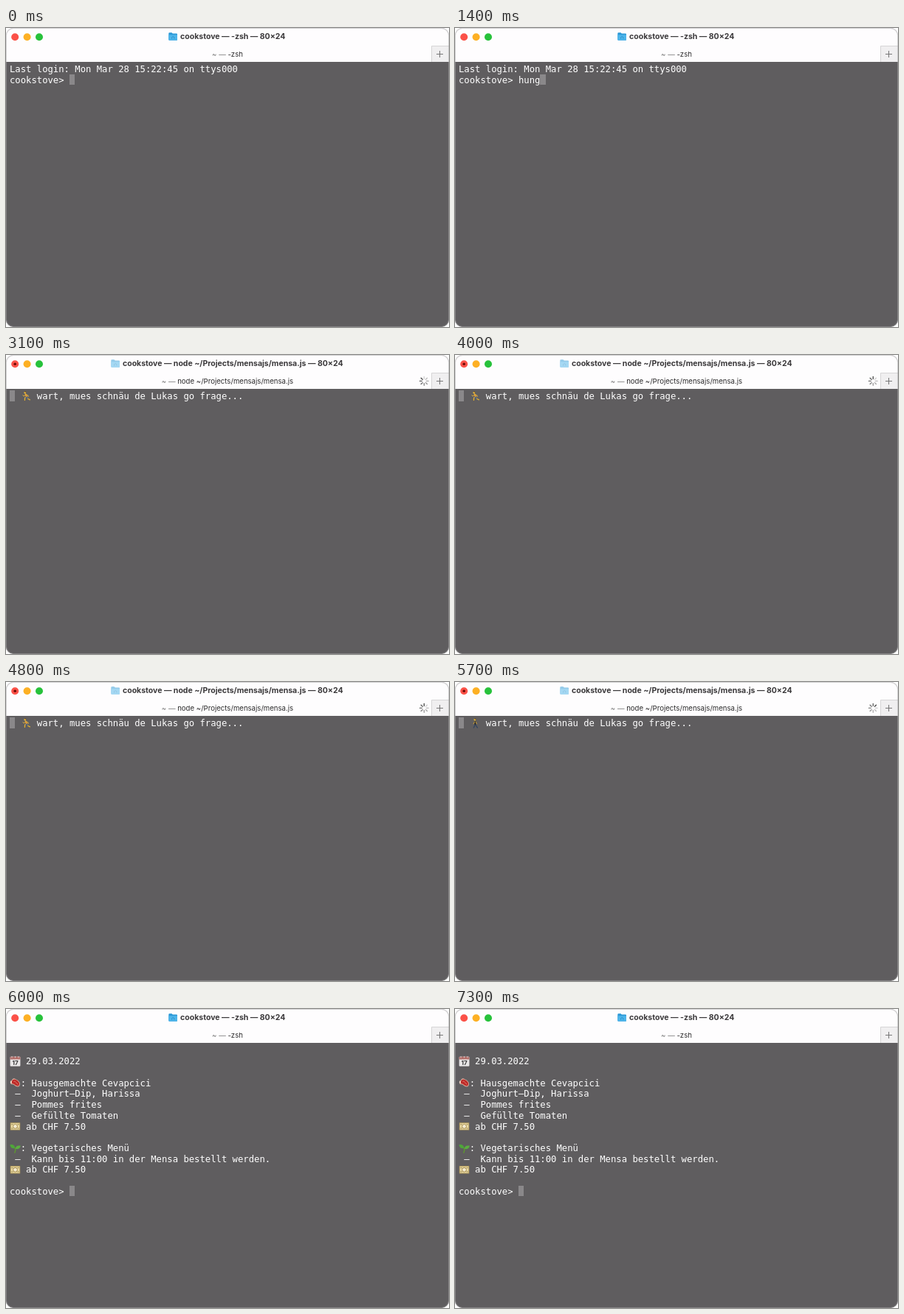
Animation, 600 px wide and 406 px high, one loop 7.4 s. Source, as an HTML page:

```html
<!DOCTYPE html>
<html lang="de">
<head>
<meta charset="utf-8">
<title>Terminal</title>
<style>
  html, body { margin: 0; width: 100%; height: 100%; overflow: hidden; background: #fff; }
  #window {
    position: absolute; left: 0; top: 0; width: 600px; height: 406px;
    overflow: hidden; border-radius: 10px; background: #5f5d5f;
    font-family: Inter, "Open Sans", sans-serif;
  }
  #window::after {
    content: ""; position: absolute; inset: 0; border-radius: 10px;
    box-shadow: inset 0 0 0 1px rgba(165, 163, 165, .5);
  }
  #bar { position: absolute; left: 0; top: 0; width: 600px; height: 46px; background: #fefdfe; }
  .title, .tab {
    position: absolute; width: 598px; height: 24px;
    display: flex; align-items: center; justify-content: center; white-space: pre;
  }
  .title { top: -1px; gap: 4px; font-weight: 700; font-size: 10.5px; color: #3a383a; }
  .tab { top: 23px; width: 600px; font-size: 9.6px; color: #2c2b2c; }
  .tab i { font-style: normal; color: #777; }
  #folder { width: 12.5px; height: 11px; }
  svg { display: block; }
  .layer { position: absolute; left: 0; top: 0; }
  pre {
    position: absolute; left: 5px; top: 49.4px; margin: 0; color: #fff;
    font: 12.228px/14.73px "DejaVu Sans Mono", "Noto Sans Mono", monospace;
    font-variant-ligatures: none;
  }
  #cursor { position: absolute; width: 7.4px; height: 14.4px; background: #8a888a; }
</style>
</head>
<body>
<div id="window">
  <div id="bar">
    <svg class="layer" width="600" height="46">
      <circle cx="12.2" cy="12.2" r="5" fill="#fb5148"/>
      <circle cx="28.6" cy="12.2" r="5" fill="#fdb024"/>
      <circle cx="45" cy="12.2" r="5" fill="#27c23b"/>
      <circle id="dot" cx="12.2" cy="12.2" r="1.8" fill="#6b0904"/>
      <rect x="576" y="24" width="24" height="22" fill="#f0eff0"/>
      <path d="M576.5 46V24.5H600" fill="none" stroke="#d6d5d6"/>
      <path d="M583 35.5h9M587.5 31v9" stroke="#777" stroke-width="1.1"/>
      <g id="spinner" transform="translate(566.3 35.4)" stroke="#4a4a4a" stroke-width="1.3" stroke-linecap="round"></g>
    </svg>
    <div class="title">
      <svg id="folder" viewBox="0 0 12.5 11">
        <path d="M.3 1.5Q.3.3 1.5.3H4.5L5.8 1.5H11Q12.2 1.5 12.2 2.7V9.5Q12.2 10.7 11 10.7H1.5Q.3 10.7.3 9.5Z" fill="#2b98d6"/>
        <path d="M.3 3.2H12.2V9.5Q12.2 10.7 11 10.7H1.5Q.3 10.7.3 9.5Z" fill="#4db5ea"/>
        <path d="M4.6 8.6V6.8L6.25 5.4 7.9 6.8V8.6" fill="none" stroke="#2489c4" stroke-width=".8"/>
      </svg>
      <span id="title"></span>
    </div>
    <div class="tab"><i>~ — </i><span id="task"></span></div>
  </div>

  <div id="cursor"></div>
  <pre id="text"></pre>

  <svg class="layer" width="600" height="406">
    <defs>
      <g id="note">
        <rect x=".8" y="1.8" width="13.4" height="10.4" rx=".6" fill="#b89f5e"/>
        <rect x="1.8" y="2.8" width="11.4" height="8.4" fill="#eadba6"/>
        <path d="M2.4 4.4h2M2.4 9.6h2M10.6 4.4h2M10.6 9.6h2" stroke="#8f7a45"/>
        <circle cx="7.5" cy="7" r="3.2" fill="#a58a4c"/>
        <circle cx="7.5" cy="7" r="2.4" fill="#f4ecd2"/>
      </g>
    </defs>
    <g id="walker" fill="none" stroke-linecap="round" stroke-linejoin="round">
      <path d="M27.4 57.4 25.4 62M27.7 57.4 28.8 59.6 30.4 62" stroke="#34465f" stroke-width="1.4"/>
      <path d="M27.4 53.6V57" stroke="#282a31" stroke-width="2.2"/>
      <path d="M26.6 54 25 56.8M28.2 54 29.4 56.8" stroke="#d8a92e" stroke-width=".9"/>
      <circle cx="27" cy="51" r="1.5" fill="#f2c23c"/>
      <path d="M26.5 49.8Q28.2 49 28.3 51" stroke="#4a3526"/>
    </g>
    <g id="runner" fill="none" stroke-linecap="round" stroke-linejoin="round">
      <path d="M28 57.2 25.6 58.2 25.4 61.4M28.4 57.2 29.8 59.5 32.4 60.8" stroke="#e2b02f" stroke-width="1.3"/>
      <path d="M26.8 53.8 28.1 57" stroke="#e79a33" stroke-width="2.1"/>
      <path d="M26.4 54 24.2 55.8 22.9 54.8M27.4 53.8 29.8 54.8 30.2 56.4" stroke="#f0c03c" stroke-width=".9"/>
      <path d="M27.9 57.4 27 58M28.4 57.4 29 58.6" stroke="#46618a" stroke-width="1.5"/>
      <circle cx="25.9" cy="51" r="1.5" fill="#f5c63f"/>
      <path d="M25.3 49.8Q27.2 49 27.3 51" stroke="#5a3e28"/>
    </g>
    <g id="icons">
      <g transform="translate(5 63.8)">
        <rect x=".6" y="1" width="13.8" height="13" rx="1" fill="#e9e7e8"/>
        <path d="M.6 4.8V2Q.6 1 1.6 1H13.4Q14.4 1 14.4 2V4.8Z" fill="#b4706b"/>
        <path d="M3 .5v2M7.5.5v2M12 .5v2" stroke="#cfcccd" stroke-width="1.1"/>
        <text x="7.5" y="12.3" text-anchor="middle" font-size="8" font-weight="700" fill="#333">17</text>
      </g>
      <g transform="translate(5 93)">
        <path d="M.8 6.4Q.6 4 2.4 4.2L4 2Q6 .6 8 2.2 11.4 3.2 13.4 6.6 15 10 12.4 12.2 9 13.4 6.4 10.6 4.8 9 3 9.2.8 9 .8 6.4Z" fill="#dfb5a6"/>
        <path d="M3 4.8Q5 1.4 7.6 2.8 11 3.8 12.8 7 14 10 11.8 11.4 9 12.2 6.8 9.8 5.2 8 3.4 8.2 1.6 7.4 3 4.8Z" fill="#bd2b28"/>
        <path d="M5.4 5.4Q7.4 4.4 8.4 6.6T11.4 9.2" fill="none" stroke="#e27a70" stroke-width=".9"/>
        <circle cx="2" cy="6.4" r="1.1" fill="#f0dccc"/>
      </g>
      <use href="#note" x="5" y="152.4"/>
      <g transform="translate(5 181.6)">
        <path d="M6.6 14Q8.6 10.5 7.4 6.6" fill="none" stroke="#5d9a2c" stroke-width="1.4"/>
        <path d="M7.4 7.4Q1 8.6.4 2.6 6.6 1.6 7.4 7.4Z" fill="#4fa53a"/>
        <path d="M7.8 8.2Q8.2 2.8 14.8 4 13.6 10 7.8 8.2Z" fill="#5bae40"/>
      </g>
      <use href="#note" x="5" y="211.3"/>
    </g>
  </svg>
</div>

<script>
  const LOOP = 7400, STEP = 100;
  const ENTER = 2400, RETITLE = 2500, WAIT = 2890, DONE = 5900;
  const COL = 7.362, ROW = 14.73;
  const KEYS = [700, 1000, 1200, 1400, 1900, 2100];
  const USER = "cookstove", COMMAND = "hunger";
  const JOB = "node ~/Projects/mensajs/mensa.js";
  const PROMPT = USER + "> ";
  const LOGIN = "Last login: Mon Mar 28 15:22:45 on ttys000\n" + PROMPT;
  const WAITING = "     wart, mues schnäu de Lukas go frage...";
  const MENU = `
   29.03.2022

  : Hausgemachte Cevapcici
 –  Joghurt–Dip, Harissa
 –  Pommes frites
 –  Gefüllte Tomaten
   ab CHF 7.50

  : Vegetarisches Menü
 –  Kann bis 11:00 in der Mensa bestellt werden.
   ab CHF 7.50

${PROMPT}`;

  const el = id => document.getElementById(id);
  const show = (id, on) => el(id).style.display = on ? "" : "none";
  const setText = (id, s) => { if (el(id).textContent !== s) el(id).textContent = s; };

  const SPOKES = 8;
  for (let i = 0; i < SPOKES; i++) {
    const line = document.createElementNS("http://www.w3.org/2000/svg", "line");
    line.setAttribute("y1", -3);
    line.setAttribute("y2", -5.9);
    line.setAttribute("transform", `rotate(${i * 360 / SPOKES})`);
    el("spinner").append(line);
  }

  function placeCursor(col, row) {
    el("cursor").style.left = 5 + col * COL + "px";
    el("cursor").style.top = 48.2 + row * ROW + "px";
  }

  function draw(t) {
    const waiting = t >= WAIT && t < DONE;
    const done = t >= DONE;
    const busy = t >= RETITLE && !done;
    const task = busy ? JOB : "-zsh";

    setText("title", `${USER} — ${task} — 80×24`);
    setText("task", task);
    el("folder").style.opacity = busy ? .5 : 1;
    show("dot", busy);
    show("spinner", busy);
    [...el("spinner").children].forEach((line, i) => {
      const age = (t / STEP - i + SPOKES) % SPOKES;
      line.style.opacity = 1 - .75 * age / (SPOKES - 1);
    });

    const running = Math.floor((t - WAIT) / 140) % 2 === 1;
    show("runner", waiting && running);
    show("walker", waiting && !running);
    show("icons", done);

    if (done) {
      setText("text", MENU);
      placeCursor(PROMPT.length, 13);
    } else if (waiting) {
      setText("text", WAITING);
      placeCursor(0, 0);
    } else {
      const typed = KEYS.filter(k => k <= t).length;
      setText("text", LOGIN + COMMAND.slice(0, typed));
      if (t < ENTER) placeCursor(PROMPT.length + typed, 1);
      else placeCursor(0, 2);
    }
  }

  const start = performance.now();
  function tick() {
    const t = (performance.now() - start) % LOOP;
    draw(Math.floor(t / STEP) * STEP);
    requestAnimationFrame(tick);
  }
  tick();
</script>
</body>
</html>
```
